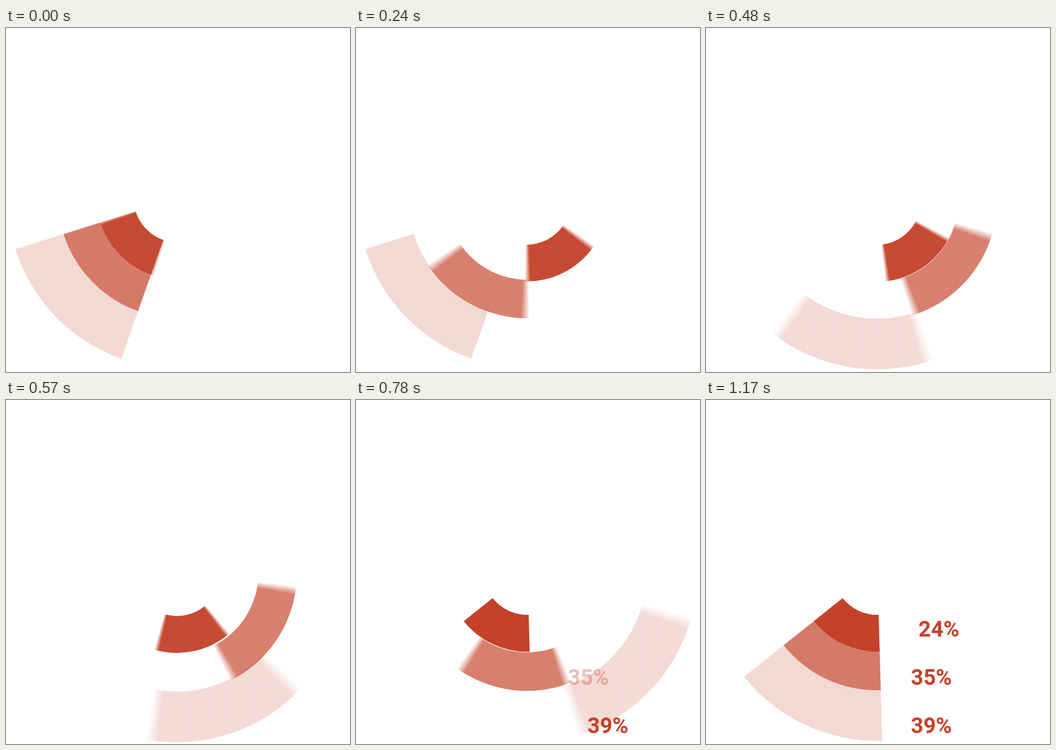
Write an HTML page with a canvas that moves like this. It is 570x570 px and loops after 1200 ms.

```html
<!DOCTYPE html>
<html lang="en">
<head>
<meta charset="utf-8">
<style>
  html, body { margin: 0; width: 100%; height: 100%; overflow: hidden; background: #fff; }
  canvas { display: block; }
</style>
</head>
<body>
<canvas id="stage" width="570" height="570"></canvas>
<script>
const ctx = document.getElementById('stage').getContext('2d');
const LOOP = 1200, FRAME = 30, SAMPLES = 12;
const RAD = Math.PI / 180;
const LEAD = 109.5, TRAIL = 162.5;          // wedge edges at rest, degrees
const SWING = 110, REST = 21.1;             // turned angle at the far point and at the end
const PIVOT = [286.3, 285], OFFSET = [-1.1, -3.4];

const rings = [
  { inner: 198.7, outer: 282.6, alpha: 0.2, start: 360, back: 300 },
  { inner: 135, outer: 198.9, alpha: 0.7, start: 180, back: 300 },
  { inner: 73.8, outer: 135, alpha: 1, start: 0, back: 360 },
];
const labels = [
  { text: '39%', y: 552, start: 600, reach: 55 },
  { text: '35%', y: 472, start: 750, reach: 58.7 },
  { text: '24%', y: 392, start: 900, reach: 62.5 },
];

const clamp = x => Math.min(1, Math.max(0, x));
const red = alpha => `rgba(196,66,42,${alpha})`;

// Out at a steady pace, then straight back
const thereAndBack = (t, out, back, far, end) =>
  t < out ? far * clamp(t / out) : far + (end - far) * clamp((t - out) / back);

function drawRing({ inner, outer, alpha, start, back }, t) {
  // Turned angles while the shutter is open, half a frame around t
  const turns = Array.from({ length: SAMPLES }, (_, i) =>
    thereAndBack(t - start + FRAME / 2 * ((i + 0.5) / SAMPLES - 0.5), 360, back, SWING, REST));
  turns.sort((a, b) => b - a);
  const most = turns[0], least = turns[SAMPLES - 1];
  const mid = (most + least) / 2 * RAD, cos = Math.cos(mid), sin = Math.sin(mid);
  const cx = PIVOT[0] + OFFSET[0] * cos + OFFSET[1] * sin;
  const cy = PIVOT[1] - OFFSET[0] * sin + OFFSET[1] * cos;
  const from = (LEAD - most) * RAD, to = (TRAIL - least) * RAD;

  ctx.fillStyle = red(alpha);
  if (most - least > 0.01) {
    const blur = ctx.createConicGradient(-Math.PI / 2, cx, cy);
    const stop = (deg, cover) => blur.addColorStop((deg + 90) / 360, red(alpha * cover));
    turns.forEach((turn, i) => stop(LEAD - turn, (i + 0.5) / SAMPLES));
    turns.forEach((turn, i) => stop(TRAIL - turn, 1 - (i + 0.5) / SAMPLES));
    ctx.fillStyle = blur;
  }
  ctx.beginPath();
  ctx.arc(cx, cy, outer, from, to);
  ctx.arc(cx, cy, inner, to, from, true);
  ctx.fill();
}

function drawLabel({ text, y, start, reach }, t) {
  ctx.fillStyle = red(clamp((t - start) / 90));
  ctx.fillText(text, 339.5 + thereAndBack(t - start, 150, 150, reach, 0), y);
}

function draw(now) {
  const t = Math.floor((now % LOOP) / FRAME + 1e-6) * FRAME;
  ctx.clearRect(0, 0, 570, 570);
  ctx.font = '700 36px Roboto, sans-serif';
  rings.forEach(ring => drawRing(ring, t));
  labels.forEach(label => drawLabel(label, t));
  requestAnimationFrame(draw);
}
requestAnimationFrame(draw);
</script>
</body>
</html>
```
